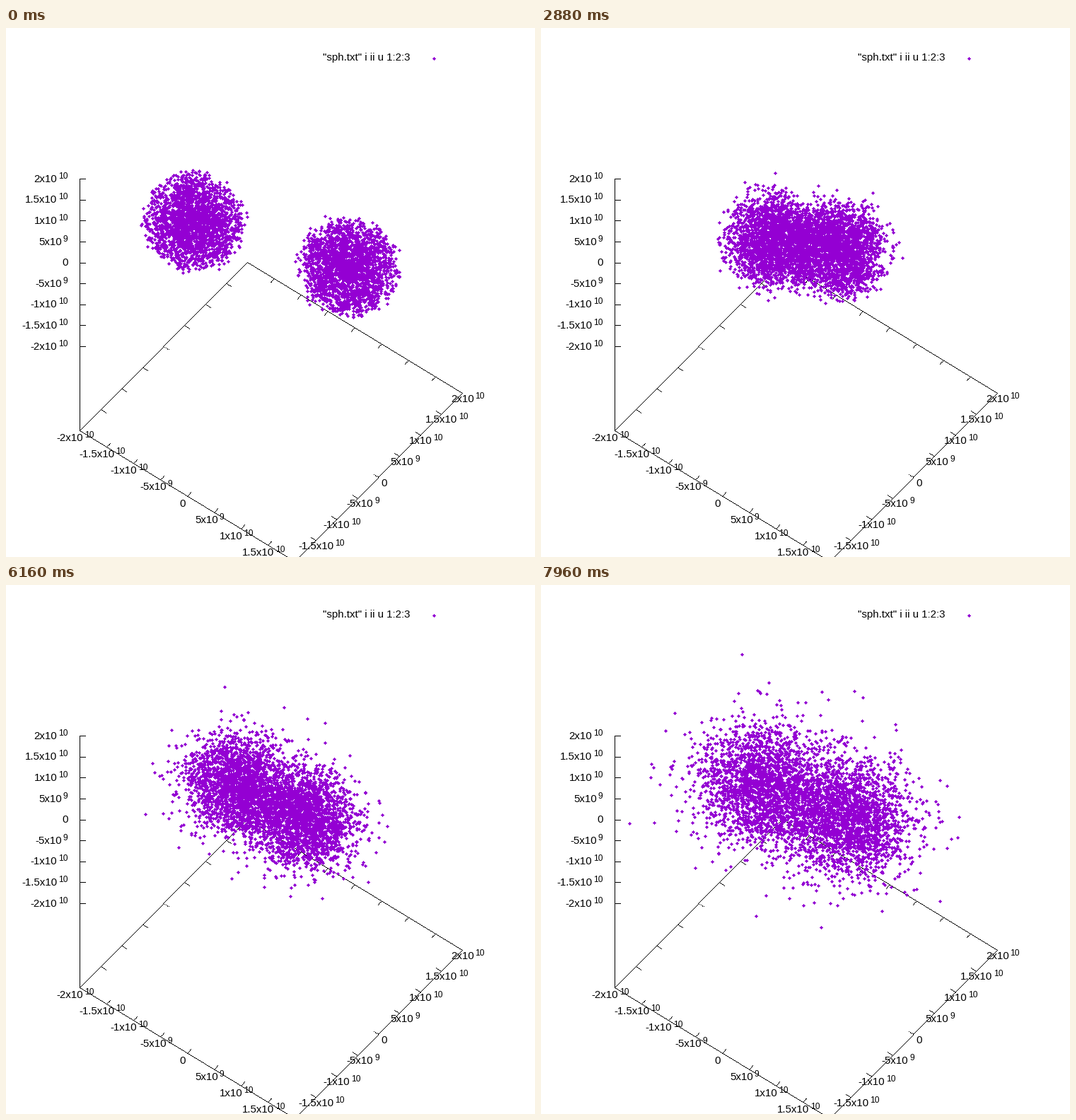
A matplotlib script for the animation above (8 s loop, 748 px wide and 748 px high).

```python
import matplotlib.pyplot as plt
import numpy as np
from matplotlib.animation import FuncAnimation
from matplotlib.path import Path

SIZE, DPI = 748, 88
FRAMES, STEP_MS = 200, 40
PX = 72 / DPI  # points per pixel
VIOLET = "#9400d3"
PER_STAR = 2400

plt.rcParams["font.family"] = "Liberation Sans"
fig = plt.figure(figsize=(SIZE / DPI, SIZE / DPI), dpi=DPI, facecolor="white")
ax = fig.add_axes([0, 0, 1, 1])
ax.set(xlim=(0, SIZE), ylim=(SIZE, 0))
ax.axis("off")


def box(x0, x1, y0, y1):
    return Path([(x0, y0), (x1, y0), (x1, y1), (x0, y1), (x0, y0)], closed=True)


# Markers made of whole pixels: a single one, and a stepped diamond 5 across.
PIXEL = box(0, 1, -1, 0)
DIAMOND = Path.make_compound_path(
    *[box(abs(r) - 2, 3 - abs(r), r - 1, r) for r in range(-2, 3)])


def scatter(x, y, marker, color, z):
    reach = np.abs(marker.vertices).max()
    line, = ax.plot(x, y, ls="none", marker=marker, ms=2 * reach * PX, mew=0,
                    color=color, zorder=z)
    return line


# --- box, ticks and labels -------------------------------------------------
LEFT, BACK, RIGHT = np.array([(104, 569), (341, 331), (645, 516)], float)
FRONT = LEFT + RIGHT - BACK
Z_ZERO, Z_STEP = 331.5, 29.6
TICK_X, TICK_Y = np.array([7, 4.3]), np.array([5.3, -5.3])
line_pixels = []


def rule(a, b):
    """One-pixel line without smoothing."""
    a, b = np.asarray(a), np.asarray(b)
    steps = int(np.ceil(np.abs(b - a).max())) + 1
    line_pixels.append(np.round(np.linspace(a, b, steps)))


def write(x, y, text, size, ha="left"):
    ax.text(x, y, text, fontsize=size * PX, ha=ha, va="baseline", color="black")


def width(text, size):
    advance = {".": 0.278, "-": 0.333, "x": 0.5}
    return size * sum(advance.get(c, 0.556) for c in text)


def label(x, y, k, align):
    """Value k * 5e9 with a raised exponent; align 0.5 centres, 1 ends at x."""
    power = "" if k == 0 else "9" if abs(k) == 1 else "10"
    base = f"{5 * k if power == '9' else k / 2:g}" + ("x10" if power else "")
    w = width(base, 15)
    x -= align * (w + (2 + width(power, 12) if power else 0))
    write(x, y + 4.6, base, 15)
    if power:
        write(x + w + 2, y - 0.4, power, 12)


for a, b in [(LEFT, FRONT), (FRONT, RIGHT), (RIGHT, BACK), (BACK, LEFT)]:
    rule(a, b)
rule(LEFT, (LEFT[0], Z_ZERO - 4 * Z_STEP))

for k in range(-4, 5):
    f = (k + 4) / 8
    front, back = LEFT + f * (FRONT - LEFT), BACK + f * (RIGHT - BACK)
    right, left = FRONT + f * (RIGHT - FRONT), LEFT + f * (BACK - LEFT)
    z = Z_ZERO - k * Z_STEP
    if abs(k) < 4:
        rule(front, front + TICK_Y)
        rule(back, back - TICK_Y)
        rule(right, right - TICK_X)
        rule(left, left + TICK_X)
    rule((LEFT[0], z), (LEFT[0] + 8, z))
    label(87.5, z, k, 1)
    if k < 4:
        label(front[0] - 6, front[1] + 10.5, k, 0.5)
    if k > -4:
        label(right[0] + 8, right[1] + 8, k, 0.5)

scatter(*np.concatenate(line_pixels).T, PIXEL, "black", 1)
write(571.5, 46, '"sph.txt" i ii u 1:2:3', 15, "right")
scatter([605], [43], DIAMOND, VIOLET, 3)

# --- particles -------------------------------------------------------------
rng = np.random.default_rng(11)
count = 2 * PER_STAR
side = np.repeat([-1, 1], PER_STAR)[:, None]

# A round ball seen from one side, and a broad cloud, both with unit spread.
ball = rng.normal(size=(count, 3))
ball *= (rng.random(count) ** 0.42 / np.linalg.norm(ball, axis=1))[:, None]
ball = ball[:, :2] / ball[:, :2].std()
cloud = rng.standard_t(16, size=(count, 2))
cloud /= cloud.std()
lag = 1.2 * rng.random((count, 1)) ** 3  # matter left between the stars

CENTRE = np.array([374.5, 305.5])
dots = scatter([], [], DIAMOND, VIOLET, 3)


def draw(frame):
    u = max(frame - 1, 0) / (FRAMES - 2)
    # The stars fall together, pass through each other and swing out again.
    star = np.array([17 + 96 * np.cos(np.pi * u ** 0.93),
                     2 + 31 * np.cos(np.pi * min(1, u / 0.8))])
    squeeze = 4 * np.exp(-((u - 0.53) / 0.1) ** 2)
    spread = 30 + 12 * u ** 4 - squeeze
    mix = 0.1 + u ** 1.3
    pos = CENTRE + side * star * (1 - np.sin(mix) * lag)
    pos += spread * (np.cos(mix) * ball + np.sin(mix) * cloud)
    dots.set_data(pos[:, 0], pos[:, 1])
    return dots,


anim = FuncAnimation(fig, draw, frames=FRAMES, interval=STEP_MS,
                     init_func=lambda: draw(0), repeat=True, repeat_delay=0)
plt.show()
```
